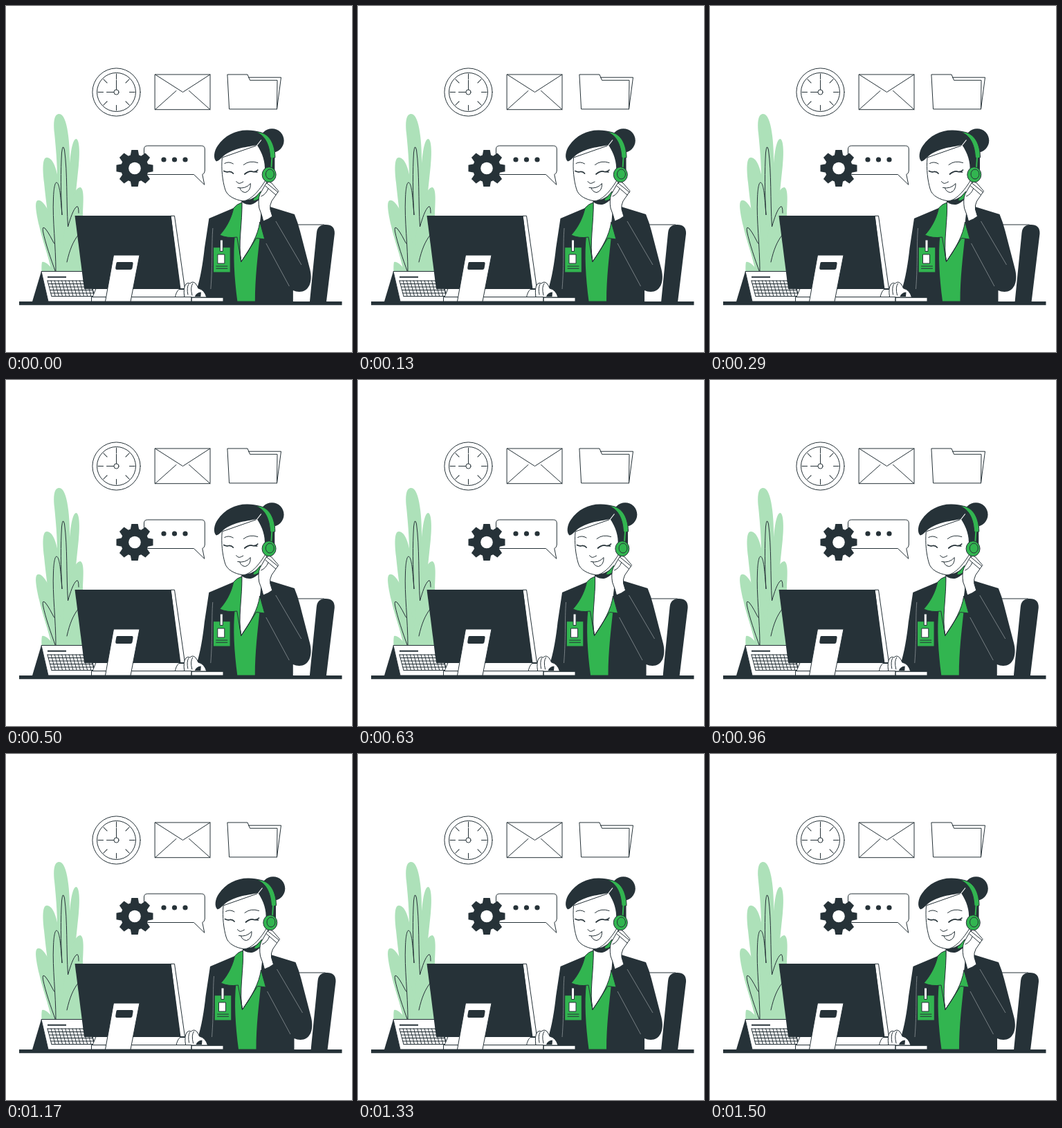
An HTML page that plays this animation: 500 px wide and 500 px high, repeating every 1.54 s.

```html
<!DOCTYPE html>
<html lang="en">
<head>
<meta charset="utf-8">
<title>Support desk</title>
<style>
  html, body { margin: 0; width: 100%; height: 100%; overflow: hidden; background: #fff; }
  svg { display: block; width: 100vw; height: 100vh; }
  .line { fill: none; stroke: #263238; stroke-width: 1; stroke-linecap: round; stroke-linejoin: round; }
  .paper { fill: #fff; stroke: #263238; stroke-width: 1; stroke-linejoin: round; }
  .dark { fill: #263238; }
  .green { fill: #32b550; }
  .trim { fill: #32b550; stroke: #263238; stroke-width: 1; stroke-linejoin: round; }
  .leaf { fill: #ade1b9; }
  .seam { fill: none; stroke: #8b9296; stroke-width: .8; }
</style>
</head>
<body>
<svg viewBox="0 0 500 500">
  <!-- clock -->
  <g class="line">
    <circle cx="159.5" cy="124.5" r="34.6"/>
    <circle cx="159.5" cy="124.5" r="28"/>
    <g id="ticks"></g>
    <path d="M159.5 107V121M145.500 124.500H156"/>
    <circle cx="159.5" cy="124.5" r="3.6"/>
  </g>

  <!-- envelope and folder -->
  <g class="line">
    <path d="M215.500 99H295V149.700H215.500ZL255.500 124.500 295 99M215.500 149.700 246 122.500M295 149.700 264.500 122.500"/>
    <path d="M320.300 99H349L352.500 107.300H392L391.500 149H323ZM350.500 103.200H397.500L391.500 149"/>
  </g>

  <!-- speech bubble and gear -->
  <path class="paper" d="M204.500 202H282.500Q287.300 202 287.300 207V238Q287.300 242 283.800 243.500L286.800 258.300 271.500 243.500H204.500Q199.500 243.500 199.500 238V207Q199.500 202 204.500 202Z"/>
  <g class="dark">
    <circle cx="228" cy="222" r="3.6"/>
    <circle cx="243.500" cy="222" r="3.6"/>
    <circle cx="259" cy="222" r="3.6"/>
    <g id="gear" transform="translate(186 234.500)"><circle r="20"/></g>
  </g>
  <circle cx="186" cy="234.5" r="8.800" fill="#fff"/>

  <!-- plant -->
  <g class="leaf">
    <path d="M77 156C70 156 68 166 70 184C72 205 74 225 74 250L78 384H102C95 330 91 285 92 235C93 200 89 156 77 156Z"/>
    <path d="M101 192C95 194 92 220 91 245L84 330 98 384C93 330 102 262 105 230C107 210 106 192 101 192Z"/>
    <path d="M59 219C52 219 53 238 55 255C58 285 64 330 72 384H92C84 345 80 310 78 275C76 240 69 219 59 219Z"/>
    <path d="M46 281C41 282 43 297 48 318C53 340 61 360 66 384H88C82 355 77 331 69 311C61 293 52 279 46 281Z"/>
    <path d="M107 262C99 263 91 285 86 315L78 384H113L111 300C112 280 113 263 107 262Z"/>
    <path d="M52 370Q58 368 70 384H51.500Q51 375 52 370Z"/>
  </g>
  <g class="line">
    <path d="M72 384C72 345 67 310 68.500 278C69 262 71 255 73 255C78 256 79 278 81 302C79 270 79 238 80.500 212Q82 198 84.500 208C89 242 87 280 89.500 319C93 307 97 294 102 290Q105 288 105 299"/>
    <path d="M71.500 384C65 366 57 343 53.500 326Q52 317 57 322C62 328 66 337 69.500 343M88 370C92 352 97 340 105 330"/>
  </g>

  <!-- calendar -->
  <path class="dark" d="M51 383.500 38 427H61Z"/>
  <path class="paper" d="M51 383.500H117L130 427H61Z"/>
  <path d="M60 391.700H87" stroke="#263238" stroke-width="2"/>
  <g id="grid" class="line"></g>

  <!-- monitor -->
  <path class="paper" d="M130 408.500H252L247 420.500H125Z"/>
  <path class="paper" d="M238 303.300H243.500L258.500 408.500H251Z"/>
  <path class="dark" d="M99.500 303H238.500L252.500 409H113Z"/>

  <g id="agent">
    <!-- chair -->
    <path class="paper" d="M410 316H460V428H410Z"/>
    <path class="dark" d="M439 428 449 328Q450 316 462 316Q475.500 316 475 329L463 428Z"/>

    <!-- jacket -->
    <path class="dark" d="M293.500 307 336 289H378L417 301Q422 313 425 325L439.500 381C444 400 437 413 424 413Q419 413 415 411V428H275V412C281 395 285 369 287 350Z"/>
    <path class="seam" d="M299 321C297 347 299 370 296 409M390 311 427 374M376 343 409.500 405"/>

    <!-- shirt and neck -->
    <path class="green" d="M331 331C328 360 330 392 334.500 426.500H360C360 392 364 362 367 332Z"/>
    <path class="paper" d="M341 283C341 303 338 320 337.500 336Q337 353 340 369.500Q358 345 367 320L371 280Z"/>
    <path class="trim" d="M341 284Q334 286 329 292C326 306 319 320 309 331Q320 336 334 334L340 369.500C335 345 342 312 341 284Z"/>
    <path class="trim" d="M367 312C364 332 354 349 340 369.500L362 335.500 374 337Z"/>

    <!-- badge -->
    <path class="trim" d="M299.700 348.700H324.300V385H299.700Z"/>
    <path class="paper" d="M309.500 338H313.500V354.500H309.500ZM306 359H316V372H306Z"/>
    <path class="line" d="M304 376H320M304 379.300H320"/>

    <!-- head -->
    <circle class="dark" cx="384.500" cy="194.500" r="17.300"/>
    <path class="dark" d="M338 279Q350 284 364 273L374 264Q367 284 354 287Q343 288 338 279Z"/>
    <path class="paper" d="M312.500 219C311 236 313 252 316.500 264C319 275 332 280 341 281.500C350 283 363 272 375 252L378 225 364 201Z"/>
    <path class="dark" d="M304 224.500C299 220 301 209 306 202C316 187 332 179.500 348 179.500C376 179 388 194 388.500 218V238H374C375 226 371 213 363 201C346 204 325 206 312 219Q307 224 304 224.500Z"/>
    <path d="M360 205 369 193.500" stroke="#fff" stroke-width="1.200"/>
    <g class="line">
      <path d="M316 227.500Q322 224 328.500 228M343.500 229.500Q352 222.500 364 226.500"/>
      <path stroke-width="1.700" d="M315 238.500Q319 240.500 322 239.500Q326 239 328.500 242M345 243Q352 237.500 357 239.500Q361 240 364 237M357 239.500 363 240"/>
      <path d="M333 253.500Q336 258 340 255.500L343 254"/>
      <path d="M335 262.500Q346 265 353.500 256.500Q354 267 346 269.500Q340 269 338 263"/>
    </g>

    <!-- headset -->
    <path class="trim" d="M361 182C377 181 389 195 389 219Q385 221 382 219C381 201 375 187 361 182Z"/>
    <path d="M384.500 219 383.500 234" stroke="#32b550" stroke-width="2"/>
    <path class="line" stroke-width="2" d="M378 252Q373 269 360 279"/>
    <path class="trim" d="M368 268 372 272Q365 282 357 281.500Q357 277 361 276Z"/>
    <ellipse class="trim" cx="380.300" cy="243.700" rx="10" ry="11"/>
    <ellipse class="trim" cx="381.500" cy="243" rx="6" ry="7"/>

    <!-- raised hand -->
    <path class="paper" d="M366 292Q364 280 367 272L375 258Q379 252 384 256L394 267.500 384 282Q381 288 382 294L385 304Q380 308 372 311Q370 302 366 292Z"/>
    <path class="line" d="M377 256 393 269M375 260 390 273M369 275Q376 272 379 264"/>

    <!-- hand on mouse -->
    <path class="paper" d="M244.500 421Q246 413 250 409.500H258V421Z"/>
    <path class="paper" d="M258 421Q256 407 260 402Q263 399 266 401Q270 397 274 401Q277 405 278 408Q287 410 290 421Z"/>
    <path class="line" d="M264 402Q261 407 263 417M270 401Q266 406 269 418"/>
    <path class="dark" d="M273 420Q275 414 282 413.500L281.500 420Z"/>
  </g>

  <!-- stand, base and desk -->
  <path class="paper" d="M123.500 420.500H268V427H123.500ZM268 421.300H314V427H268Z"/>
  <path class="paper" d="M155.500 360H193L180 427H143.500Z"/>
  <path class="dark" d="M161 370H182Q184 370 183.500 373L182.500 379Q182 381 180 381H160Q158 381 158.300 378L159.300 372Q159.500 370 161 370Z"/>
  <path class="dark" d="M19 427H485.500V432.300H19Z"/>
</svg>
<script>
  const $ = id => document.getElementById(id);
  const path = d => `<path d="${d}"/>`;

  let ticks = '', teeth = '', grid = '';
  for (let a = 0; a < 360; a += 45) {
    ticks += `<path d="M159.500 98V105.500" transform="rotate(${a} 159.500 124.500)"/>`;
    teeth += `<path d="M-6.500 -17 -4.700 -26.500H4.700L6.500 -17Z" transform="rotate(${a})"/>`;
  }
  for (let r = 0; r <= 5; r++) {
    const x = 60 + r * 1.2, y = 397 + r * 4.5;
    grid += path(`M${x} ${y}h62`);
  }
  for (let c = 0; c <= 12; c++) grid += path(`M${60 + c * 5.17} 397l6 22.500`);
  $('ticks').innerHTML = ticks;
  $('gear').innerHTML += teeth;
  $('grid').innerHTML = grid;

  // Sideways shake in px, one key per 150 ms, shown at 24 steps a second
  const keys = [0, -1, 2, -4, 4, -4, 4, -4, 2, -1, 0];
  const loop = 1540, fps = 24;

  function shake(t) {
    const step = Math.floor((t + 5) * fps / 1000);
    const p = Math.min((step + .5) / fps / .15, 10);
    const i = Math.min(Math.floor(p), 9);
    return keys[i] + (keys[i + 1] - keys[i]) * (p - i);
  }

  const agent = $('agent');
  let start;
  function draw(now) {
    start ??= now;
    agent.setAttribute('transform', `translate(${shake((now - start) % loop).toFixed(3)} 0)`);
    requestAnimationFrame(draw);
  }
  requestAnimationFrame(draw);
</script>
</body>
</html>
```
